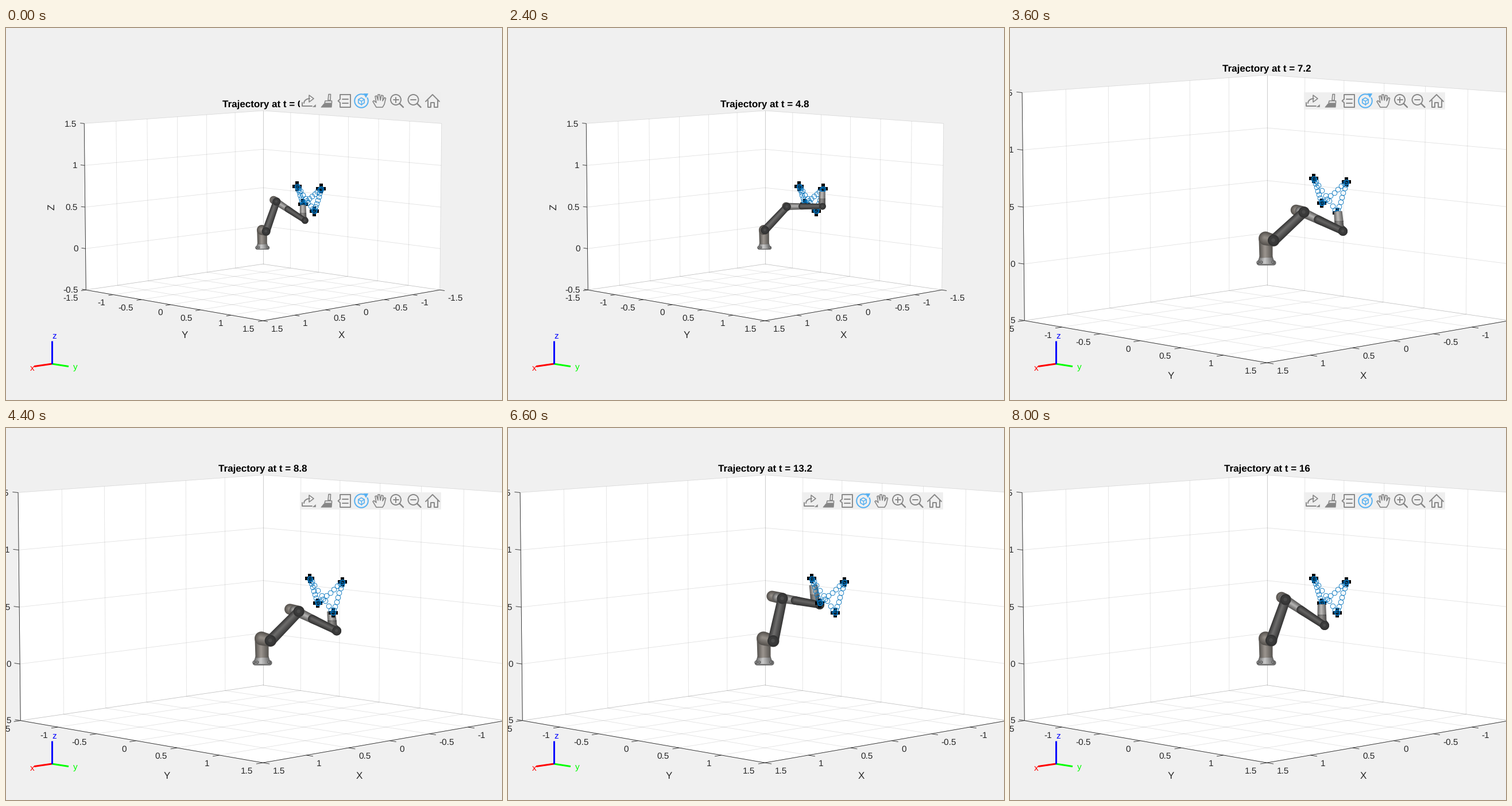
Write a matplotlib script that moves like this. It is 864x648 px and loops after 8.2 s.

```python
import numpy as np
import matplotlib as mpl
import matplotlib.pyplot as plt
from matplotlib.animation import FuncAnimation
from matplotlib.collections import LineCollection, PolyCollection
from matplotlib.colors import to_rgb
from matplotlib.patches import Arc, Circle, Polygon, Rectangle

mpl.rcParams.update({"font.family": "Liberation Sans", "text.hinting": "none"})

W, H, FRAMES, STEP = 864, 648, 41, 0.4
CX, CY = 447.5, 312
INK, GRAY, BLUE, TRACE = "#262626", "#868686", "#55b0f2", "#0072bd"
SMALL, LARGE = 15.43, 16.97
ZOOMS = [1, 1.11, 1.23, 1.37]
FULL = ZOOMS[-1]
TICKS = np.arange(-1.5, 1.6, 0.5)
ZTICKS = np.arange(-0.5, 1.6, 0.5)

# Robot poses at the waypoints, in pixels at full zoom
TIP = np.array([(543, 305), (586, 268), (570, 322), (529, 262)], float)
SHOULDER = np.array([(455, 370), (446.3, 366.5), (460.3, 370.4), (463.8, 371.2)])
ELBOW = np.array([(480, 299), (498.8, 310), (513.3, 322), (477.5, 296.5)])
WRIST = np.array([(548, 344), (585.5, 305.3), (579.5, 358.8), (541.7, 298.8)])
BACK = np.array([(-7, -4), (-1, -1), (-15, -4), (-21, -4)], float)
COLUMN = np.array([445.0, 366.5])

fig = plt.figure(figsize=(W / 72, H / 72), dpi=72, facecolor="#f0f0f0")
ax = fig.add_axes([0, 0, 1, 1])


def project(x, y, z, s):
    """Perspective camera looking along the diagonal of the axes."""
    dist, sin, cos = 24.3, 0.1186, 0.9929
    right, near, up = (y - x) / 2 ** 0.5, (x + y) / 2 ** 0.5, z - 0.5
    k = 146 * dist * s / (dist - near * cos - up * sin)
    return np.array([CX + k * right, CY - k * (up * cos - near * sin)])


def zoomed(p, s):
    return np.array([CX, CY]) + (np.asarray(p) - [CX, CY]) * s / FULL


def ease(u):
    """Trapezoidal velocity profile."""
    if u < 1 / 3:
        return 2.25 * u * u
    if u > 2 / 3:
        return 1 - 2.25 * (1 - u) ** 2
    return 0.25 + 1.5 * (u - 1 / 3)


def along(points, t):
    k = min(int(t / 4 + 1e-9), 3)
    f = ease(t / 4 - k)
    return points[k] * (1 - f) + points[(k + 1) % 4] * f


def label(x, y, text, size=SMALL, color=INK, **kw):
    kw.setdefault("ha", "center")
    ax.text(x, y + 0.36 * size, text, fontsize=size, color=color,
            va="baseline", **kw)


def lines(segments, color, width, zorder, **kw):
    ax.add_collection(LineCollection(segments, colors=color, linewidths=width,
                                     zorder=zorder, **kw), autolim=False)


def draw_axes(s):
    lo, hi, zlo, zhi = -1.5, 1.5, -0.5, 1.5

    def seg(a, b):
        return [project(*a, s), project(*b, s)]

    walls = [
        [(lo, lo, zlo), (hi, lo, zlo), (hi, lo, zhi), (lo, lo, zhi)],
        [(lo, lo, zlo), (lo, hi, zlo), (lo, hi, zhi), (lo, lo, zhi)],
        [(lo, lo, zlo), (hi, lo, zlo), (hi, hi, zlo), (lo, hi, zlo)],
    ]
    for wall in walls:
        ax.add_patch(Polygon([project(*p, s) for p in wall], fc="white", ec="none"))

    grid = []
    for v in TICKS:
        grid += [seg((v, lo, zlo), (v, lo, zhi)), seg((lo, v, zlo), (lo, v, zhi)),
                 seg((v, lo, zlo), (v, hi, zlo)), seg((lo, v, zlo), (hi, v, zlo))]
    for z in ZTICKS:
        grid += [seg((lo, lo, z), (hi, lo, z)), seg((lo, lo, z), (lo, hi, z))]
    lines(grid, INK, 0.77, 1.2, alpha=0.15)

    rulers = [seg((hi, lo, zlo), (hi, lo, zhi)), seg((hi, lo, zlo), (hi, hi, zlo)),
              seg((lo, hi, zlo), (hi, hi, zlo))]
    tick = 0.075
    for v in TICKS:
        for a, b, gap, ha in [((v, hi), (v, hi + tick), 5.5, "left"),
                              ((hi, v), (hi + tick, v), -5.5, "right")]:
            rulers.append(seg((*a, zlo), (*b, zlo)))
            x, y = rulers[-1][1]
            label(x + gap, y + 11.6, f"{v:g}", ha=ha)
    for z in ZTICKS:
        rulers.append(seg((hi, lo, z), (hi, lo - tick, z)))
        x, y = rulers[-1][1]
        label(x - 6, y + 0.3, f"{z:g}", ha="right")
    lines(rulers, INK, 0.85, 1.4)

    dx, y = 136.5 + 83.8 * (s - 1), 534 + 192 * (s - 1)
    label(CX + dx, y, "X", LARGE)
    label(CX - dx, y, "Y", LARGE)
    zx = project(hi, lo, zhi, s)[0] - 56
    ax.text(zx, CY, "Z", fontsize=LARGE, color=INK, rotation=90,
            ha="center", va="center")


def draw_path(s):
    pts = zoomed([along(TIP, i * STEP) for i in range(FRAMES)], s)
    for x, y in zoomed(TIP, s):
        for dx, dy in [(-5.4, 0), (5.4, 0), (0, -5.4), (0, 5.4)]:
            ax.plot(x + dx, y + dy, "s", ms=5.4, color="black", mew=0, zorder=3)
        ax.plot(x, y, "s", ms=7, color="#0a1a26", mew=0, zorder=3)
    ax.plot(*pts.T, "o", ms=8.6, mfc="none", mec=TRACE, mew=0.85, zorder=3.1)


def shade(parts, p, q, rp, rq, dark, light, flat=False, n=7):
    """Round limb from p to q, built of nested layers from dark to light."""
    p, q = np.asarray(p, float), np.asarray(q, float)
    a = np.arctan2(*(q - p)[::-1])
    turn = np.linspace(-np.pi / 2, np.pi / 2, 2 if flat else 16)
    dark, light = np.array(to_rgb(dark)), np.array(to_rgb(light))
    for k in range(n):
        f = 1 - k / n
        arcs = [c + f * r * np.c_[np.cos(a + b + turn), np.sin(a + b + turn)]
                for c, r, b in ((q, rq, 0), (p, rp, np.pi))]
        shift = (1 - f) * np.array([-0.15 * rp, 0 if flat else -0.15 * rp])
        parts.append((np.vstack(arcs) + shift, dark + (light - dark) * k / (n - 1)))


def disc(parts, c, r):
    shade(parts, c, c, r, r, "#333333", "#5a5a59", n=3)
    shade(parts, c, c, r * 0.68, r * 0.68, "#3a3a3a", "#4a4a4a", n=2)


def draw_robot(t, s):
    tip, sh, el, wr = (along(p, t) for p in (TIP, SHOULDER, ELBOW, WRIST))
    back = along(BACK, t)
    tip = tip + [0, 2.5]
    axis = sh - COLUMN
    rear = el + back
    fore = el + back / 2
    hand = wr - [0.45 * axis[0], 6]
    parts = []

    # Base and column
    shade(parts, (434, 409), (459, 409), 4.5, 4.5, "#5e5e5e", "#a8a8a8")
    shade(parts, (446, 411), (446, 398), 16, 11.5, "#6c6c6c", "#c4c4c4", flat=True)
    for x in (432, 438, 458):
        shade(parts, (x, 408), (x, 408), 2.4, 2.4, "#4a4a4a", "#b4b4b4", n=3)
    shade(parts, (446, 400), (445.5, 368), 11.5, 12, "#5a5753", "#97918b", flat=True)
    shade(parts, COLUMN, sh, 12, 10.5, "#57534f", "#928c86")

    # Wrist and hand
    mid = hand + (tip - hand) * 0.4
    shade(parts, hand, wr, 8, 8, "#3c3c3c", "#6e6d6c")
    shade(parts, hand + [0, 3], mid, 8, 7.8, "#504f4e", "#8d8b89", flat=True)
    shade(parts, mid, tip, 7.8, 7.2, "#696867", "#b9b7b5", flat=True)
    shade(parts, mid + [0, 0.7], mid - [0, 0.7], 7.8, 7.8, "#4a4a4a", "#7c7b7a",
          flat=True, n=3)

    # Elbow and forearm
    shade(parts, rear, el, 9.5, 10, "#57534f", "#928c86")
    reach = wr - fore
    shade(parts, fore, fore + reach * 0.5, 8.5, 7.2, "#5c5b5a", "#b0afae")
    shade(parts, fore + reach * 0.42, wr, 7.4, 6.4, "#343434", "#636261")
    disc(parts, wr, 8)

    # Upper arm
    shade(parts, sh, el, 9.6, 8.4, "#383838", "#6b6a69")
    disc(parts, sh, 10)
    disc(parts, el, 9.6)

    behind = 8 < t < 14.8
    ax.add_collection(PolyCollection(
        [zoomed(v, s) for v, _ in parts], facecolors=[c for _, c in parts],
        edgecolors="none", zorder=2 if behind else 4), autolim=False)


def draw_triad():
    for x, y, color, lx, ly, name in [(49, 589.5, "#ff0000", 46, 591, "x"),
                                      (109, 589.5, "#00ff00", 121, 590.5, "y"),
                                      (80, 545, "#0000ff", 84, 535.5, "z")]:
        ax.plot([80, x], [585, y], color=color, lw=3, solid_capstyle="butt", zorder=6)
        label(lx, ly, name, color=color, zorder=6)


def draw_toolbar():
    ax.add_patch(Rectangle((512, 112), 245.5, 30, fc="#efefef", ec="none", zorder=8))

    def stroke(pts, color=GRAY, lw=1.9, close=False, fill="none"):
        ax.add_patch(Polygon(pts, closed=close, fc=fill, ec=color, lw=lw,
                             joinstyle="round", capstyle="round", zorder=9))

    def box(x, y, w, h, **kw):
        stroke([(x, y), (x + w, y), (x + w, y + h), (x, y + h)], close=True, **kw)

    # Export
    stroke([(516, 130), (516, 136), (533, 136)])
    u = np.linspace(0, np.pi / 2, 10)
    stroke(np.c_[529 - 10 * np.cos(u), 131 - 8 * np.sin(u)])
    stroke([(528, 117), (536, 123), (528, 129)], close=True, lw=1.6)
    stroke([(534, 137), (538.5, 137), (538.5, 132.5)], lw=0.5, close=True, fill=GRAY)

    # Brush
    stroke([(561, 126), (562, 115.5), (565.5, 115.5), (565, 126)], close=True, lw=1.6)
    stroke([(556, 127), (567.5, 127), (567.5, 131), (555, 131)], close=True, lw=1.6)
    stroke([(554, 132), (567.5, 132), (567, 138), (549, 138)], close=True,
           lw=1, fill=GRAY)

    # Data tip
    stroke([(582, 116), (600, 116), (600, 138), (582, 138), (582, 130),
            (578.5, 127), (582, 124)], close=True)
    stroke([(586, 123.5), (596, 123.5)])
    stroke([(586, 130.5), (596, 130.5)])

    # Rotate
    ax.add_patch(Arc((619, 127), 23.5, 23.5, theta1=-30, theta2=292,
                     color=BLUE, lw=2, zorder=9))
    stroke([(623, 114.5), (630.5, 114.5), (627, 121)], BLUE, 0.8, True, BLUE)
    a = np.pi / 6 + np.arange(6) * np.pi / 3
    hexagon = np.c_[619 + 6 * np.cos(a), 127.5 + 6 * np.sin(a)]
    stroke(hexagon, BLUE, 1.6, True)
    for k in (1, 3, 5):
        stroke([(619, 127.5), hexagon[k]], BLUE, 1.4)

    # Pan
    stroke([(645, 138), (639, 128), (641, 126.5), (645, 130), (643, 119),
            (645.5, 118), (648, 126), (648, 116), (651, 116), (652, 126),
            (654, 117), (657, 118), (656, 127), (659.5, 121), (661.5, 122.5),
            (659, 133), (656, 138)], lw=1.6, close=True)

    # Zoom in and out
    for x in (679, 709.5):
        ax.add_patch(Circle((x, 125), 9, fc="none", ec=GRAY, lw=1.9, zorder=9))
        stroke([(x + 6.5, 131.5), (x + 13, 138)], lw=2.4)
        stroke([(x - 4.5, 125), (x + 4.5, 125)])
    stroke([(679, 120.5), (679, 129.5)])

    # Home
    stroke([(731, 128), (743, 116), (755, 128)])
    stroke([(734.5, 126), (734.5, 138), (740, 138), (740, 130), (746, 130),
            (746, 138), (751.5, 138), (751.5, 126)])


def draw(i):
    ax.clear()
    ax.set(xlim=(0, W), ylim=(H, 0))
    ax.axis("off")
    t = round(i * STEP, 1)
    s = ZOOMS[min(max(i - 14, 0), 3)]
    draw_axes(s)
    draw_path(s)
    draw_robot(t, s)
    top = project(-1.5, -1.5, 1.5, s)[1]
    label(CX, top - 12.5, f"Trajectory at t = {t:g}", LARGE, "black", weight="bold")
    draw_triad()
    if i < 3 or i >= 14:
        draw_toolbar()
    return []


anim = FuncAnimation(fig, draw, frames=FRAMES, interval=200, repeat=True,
                     init_func=lambda: [], blit=False)
plt.show()
```
